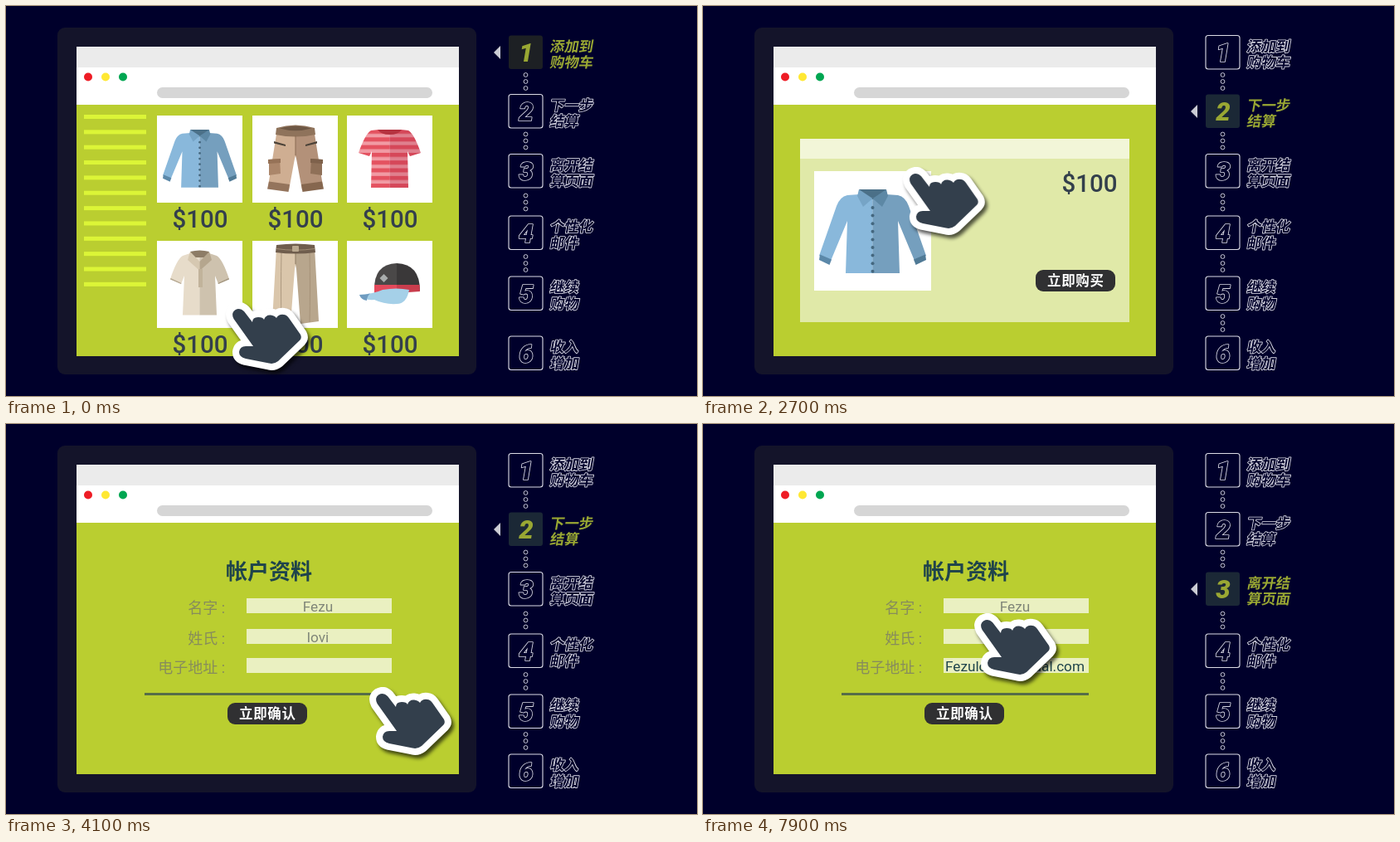
Animation, 833 px wide and 470 px high, one loop 8000 ms. Source, as an HTML page:

```html
<!DOCTYPE html>
<html lang="zh-CN">
<head>
<meta charset="utf-8">
<title>购物流程</title>
<style>
html, body { margin: 0; width: 100%; height: 100%; overflow: hidden; background: #00002b; }
svg { display: block; }
text { font-family: Roboto, "Noto Sans CJK SC", sans-serif; text-anchor: middle; }
.price { font-size: 29.5px; font-weight: 500; fill: #333f4c; }
.btn { font-size: 16.5px; font-weight: 700; fill: #fff; letter-spacing: .6px; }
.label { font-size: 18px; fill: #878c5c; text-anchor: end; font-weight: 400; }
.value { font-size: 17.2px; font-weight: 400; fill: #7f8578; }
.title { font-size: 26px; font-weight: 700; fill: #1f444b; }
.num { font: italic 900 31px Roboto, sans-serif; }
.cap { font-size: 17.4px; font-weight: 700; text-anchor: start; }
.off text { fill: #00002b; stroke: #dcdce6; stroke-width: 1.7px; paint-order: stroke; stroke-linejoin: round; }
.off rect { fill: none; stroke: #dcdce6; stroke-width: 1.1px; }
.on text { fill: #99a733; }
.on path { fill: #cbccd4; }
.dots { fill: none; stroke: #c8c8d4; stroke-width: 1px; }

#hand, #shop, #item, #form, .on, .off, #late { animation: 8s -1ms step-end infinite; }
#hand { animation-name: hand; }
#shop { animation-name: shop; }
#item { animation-name: item; }
#form { animation-name: form; }
#late { animation-name: late; }
.on.s1 { animation-name: on1; } .off.s1 { animation-name: off1; }
.on.s2 { animation-name: on2; } .off.s2 { animation-name: off2; }
.on.s3 { animation-name: on3; } .off.s3 { animation-name: off3; }

@keyframes hand {
  0% { transform: translate(265px, 357px); }
  6.25% { transform: translate(265px, 357px); animation-timing-function: steps(9, start); }
  17.5% { transform: translate(230px, 221px); animation-timing-function: steps(4, start); }
  22.5% { transform: translate(223px, 183px); }
  33.75% { transform: translate(223px, 183px); animation-timing-function: steps(6, start); }
  41.25% { transform: translate(330px, 249px); animation-timing-function: steps(3, start); }
  45% { transform: translate(378px, 278px); animation-timing-function: steps(6, start); }
  52.5% { transform: translate(438px, 317px); }
  63.75% { transform: translate(438px, 300px); }
  92.5% { transform: translate(438px, 300px); animation-timing-function: steps(6, start); }
  100% { transform: translate(327px, 228px); }
}
@keyframes shop {
  0% { opacity: 1; }
  17.5% { opacity: 1; animation-timing-function: steps(4, start); }
  22.5%, 100% { opacity: 0; }
}
@keyframes item {
  0% { opacity: 0; }
  17.5% { opacity: 0; animation-timing-function: steps(4, start); }
  22.5% { opacity: 1; }
  45% { opacity: 1; animation-timing-function: steps(6, start); }
  52.5%, 100% { opacity: 0; }
}
@keyframes form {
  0% { opacity: 0; }
  45% { opacity: 0; animation-timing-function: steps(6, start); }
  52.5%, 100% { opacity: 1; }
}
@keyframes late { 0% { visibility: hidden; } 27.5%, 100% { visibility: visible; } }
@keyframes on1 { 0% { visibility: visible; } 27.5%, 100% { visibility: hidden; } }
@keyframes off1 { 0% { visibility: hidden; } 27.5%, 100% { visibility: visible; } }
@keyframes on2 { 0% { visibility: hidden; } 27.5% { visibility: visible; } 57.5%, 100% { visibility: hidden; } }
@keyframes off2 { 0% { visibility: visible; } 27.5% { visibility: hidden; } 57.5%, 100% { visibility: visible; } }
@keyframes on3 { 0% { visibility: hidden; } 57.5%, 100% { visibility: visible; } }
@keyframes off3 { 0% { visibility: visible; } 57.5%, 100% { visibility: hidden; } }
</style>
</head>
<body>
<svg id="stage" width="833" height="470" viewBox="0 0 833 470"></svg>
<script>
const rect = (x, y, w, h, fill, r = 0) =>
  `<rect x="${x}" y="${y}" width="${w}" height="${h}" rx="${r}" fill="${fill}"/>`;
const path = (d, fill, extra = '') => `<path d="${d}" fill="${fill}" ${extra}/>`;
const dot = (x, y, r, fill) => `<circle cx="${x}" cy="${y}" r="${r}" fill="${fill}"/>`;
const text = (x, y, cls, s, extra = '') => `<text x="${x}" y="${y}" class="${cls}" ${extra}>${s}</text>`;
const group = (x, y, body, scale = 1) => `<g transform="translate(${x} ${y}) scale(${scale})">${body}</g>`;
const range = (n, fn) => Array.from({ length: n }, (_, i) => fn(i)).join('');
const line = (d, color, w = 1) => `<path d="${d}" fill="none" stroke="${color}" stroke-width="${w}"/>`;

// A left half plus its mirror image about x = mid
const halves = (mid, d, left, right) =>
  path(d, left) + path(d, right, `transform="translate(${mid * 2} 0) scale(-1 1)"`);

const shirt =
  halves(70.5, 'M54 28L40 29Q31 31 27 42L6 102L20 108L40 60L38 123H70.6V28Z', '#89b8db', '#759fbe') +
  halves(70.5, 'M7 100.5L21 106.5L18.5 113L6 107Z', '#5b88a9', '#507a96') +
  path('M54 22H87L83 34H58Z', '#4b7088') +
  halves(70.5, 'M54 22L70.5 33L59 43L52 30Z', '#76a4c6', '#5d88a5') +
  range(9, i => dot(70.5, 44 + i * 9.6, 2, '#44677f'));

const shorts =
  halves(52, 'M30 16L19 85L44 90L51 52L52.1 48V16Z', '#cfae92', '#b39179') +
  halves(52, 'M20 79.5L45 83L43.5 92L18 88.5Z', '#94745c', '#86674f') +
  halves(52, 'M20 53L33 52L34 70L20 72Z', '#ab866a', '#8f7058') +
  halves(52, 'M19 53L34 52V57L19 58Z', '#967257', '#7e614b') +
  halves(52, 'M26 31L40 35V37L26 33.5Z', '#4b4238', '#4b4238') +
  path('M29 15Q52 8 75 15L76 23Q52 28 28 23Z', '#8f735b') +
  path('M33 15.5Q52 10 71 15.5Q52 21 33 15.5Z', '#6d5744') +
  line('M52 24V48', '#8b6c55');

const teeShape = 'M38 17L29 18Q22 22 14 45L27 49L30 43L29 87H51.6V17Z';
const tee =
  halves(51.5, teeShape, 'url(#stripes)', 'url(#stripes)') +
  path(teeShape, '#a02040', 'opacity=".22" transform="translate(103 0) scale(-1 1)"') +
  path('M37 17H66Q62 23 51.5 23Q41 23 37 17Z', '#b5323f');

const polo =
  halves(51.5, 'M40 15L31 18Q24 22 16 46L29 52L33 42L31 89.5H51.6V15Z', '#e7dcca', '#cec2ae') +
  halves(51.5, 'M16.6 45L29.5 51L29 52L16 46.5Z', '#b5a892', '#a39680') +
  path('M40 13Q51.5 10 63 13L60 20H43Z', '#8d7c66') +
  halves(51.5, 'M40 13L51.5 25V36L37 23Z', '#d6c8b1', '#b5a68e') +
  path('M50 34H55V56H50Z', '#c1b39b');

const pants =
  halves(52, 'M29 8L24 97L46 100L51 34L52.1 28V8Z', '#dac6ab', '#b8a68d') +
  line('M35 14Q34 60 35 98M69 14Q70 60 69 98', '#a18d74', .8) +
  line('M52 14V28', '#8f7c65') +
  path('M29 5Q52 2 75 5L76 14Q52 17 28 14Z', '#6f5d4d') +
  line('M29 9.5Q52 13 75 9.5', '#a08c75') +
  rect(48, 6, 8, 7, '#b9a88f', 1);

const cap =
  path('M33 60Q32 28 60 27V62Z', '#4a4848') +
  path('M60 27Q88 28 88 60L60 62Z', '#3a3839') +
  path('M33 53H60V63H33Z', '#e4495b') +
  path('M60 53H87.6L88 61L60 63Z', '#c93d4d') +
  path('M44.5 40L49.5 45L44.5 50L39.5 45Z', '#a9adad') +
  path('M15 65Q32 64 43 59Q60 56 75 59Q72 76 60 76Q46 77 33 71Q20 72 15 65Z', '#a5d0e8') +
  path('M15 65Q22 65 28 63.5Q24 67 24 72Q17 71 15 65Z', '#6f9cc0');

const goods = [group(2.9, 1.8, shirt, .69), shorts, tee, polo, pants, cap];
const columns = [182, 297, 411];
const shop =
  range(12, i => rect(94, 131 + i * 18.35, 75, 5, '#dcf537')) +
  goods.map((g, i) => {
    const x = columns[i % 3], y = i < 3 ? 132 : 283;
    return rect(x, y, 103, 105, '#fff') + group(x, y, g) + text(x + 52, y + 134.5, 'price', '$100');
  }).join('');

const button = (x, y, s) => rect(x, y, 96, 26, '#303032', 9) + text(x + 48.3, y + 19, 'btn', s);

const item =
  rect(117, 160, 397, 221, '#e0e9a8') + rect(117, 160, 397, 24, '#f2f6d8') +
  rect(134, 199, 141, 144, '#fff') + group(134, 199, shirt) +
  text(466, 223.5, 'price', '$100') + button(401, 318, '立即购买');

const field = (y, label, value, extra) =>
  rect(290, y, 175, 18, '#eaf0c1') + text(264, y + 18, 'label', label + ' :') +
  text(376, y + 15.5, 'value', value, extra);
const form =
  text(317, 187, 'title', '帐户资料') +
  field(210, '名字', 'Fezu') + field(247, '姓氏', 'lovi') +
  field(282, '电子地址', '', 'id="mail" style="fill:#1f444b"') +
  rect(167, 324, 298, 3, '#566d48') + button(267, 336, '立即确认');

const steps = [
  [56, '添加到', '购物车'], [127, '下一步', '结算'], [199, '离开结', '算页面'],
  [273.5, '个性化', '邮件'], [346.5, '继续', '购物'], [418.5, '收入', '增加']
];
const caption = (y, s) => text(0, 0, 'cap', s, `transform="translate(655 ${y}) skewX(-10)"`);
const words = (y, i, a, b) =>
  text(627, y + 11, 'num', i + 1) + caption(y - 1.5, a) + caption(y + 18, b);
const stepList = steps.map(([y, a, b], i) => {
  const box = fill => rect(606, y - 20.5, 41, 40.5, fill, 3);
  const off = `<g class="off s${i + 1}">${box('none')}${words(y, i, a, b)}</g>`;
  if (i > 2) return off;
  const on = box(i ? '#1b2836' : '#1d2024') + words(y, i, a, b) + `<path d="M588 ${y}l8 -8v16z"/>`;
  return off + `<g class="on s${i + 1}">${on}</g>`;
}).join('');
const dotList = [83, 154.5, 228.5, 302, 374].map((y, i) =>
  `<g class="dots" ${i === 4 ? 'id="late"' : ''}>${range(3, k => dot(626.5, y + k * 8, 2.4, 'none'))}</g>`).join('');

const handShape = 'M9.5 20Q6 13 11 9.5Q17 6 22 11L32 24Q32 18 39 18Q45 18 46 21Q48 15 54 15.5Q59 16 61 19' +
  'Q64 14 70 15Q73 15 76 19L90 39Q92 43 89 46L63 71Q58 75 52 73.5L24 68Q16 66 16 60Q17 53 24 53L33 53Z';
const hand =
  `<g style="filter:drop-shadow(3px 4px 2px rgba(0,0,0,.65))">` +
  path(handShape, '#fff', 'stroke="#fff" stroke-width="16" stroke-linejoin="round"') + '</g>' +
  path(handShape, '#333f4c');

const layer = (id, body) => `<g id="${id}">${body}</g>`;
document.getElementById('stage').innerHTML =
  `<defs><pattern id="stripes" width="10" height="9.3" y="17" patternUnits="userSpaceOnUse">
    ${rect(0, 0, 10, 9.3, '#f19ba4')}${rect(0, 0, 10, 5, '#e45260')}</pattern></defs>` +
  rect(0, 0, 833, 470, '#00002b') + rect(62, 26, 505, 418, '#14142a', 9) +
  rect(85, 49, 461, 373, '#bace30') + rect(85, 49, 461, 70, '#fff') + rect(85, 49, 461, 25, '#ebebeb') +
  dot(99, 85.5, 5, '#ee1c25') + dot(120, 85.5, 5, '#ffe833') + dot(141, 85.5, 5, '#00a651') +
  rect(182, 98, 332, 13, '#d6d6d6', 6.5) +
  layer('shop', shop) + layer('item', item) + layer('form', form) +
  stepList + dotList + layer('hand', hand);

// Typing shares the clock of the hand's animation
const address = 'Fezulovi@qenual.com';
const mail = document.getElementById('mail');
const clock = document.getElementById('hand').getAnimations()[0];
function type() {
  const t = ((clock.currentTime || 0) + 1) % 8000;
  const typed = address.slice(0, Math.max(0, Math.floor(t / 100) - 55));
  if (mail.textContent !== typed) mail.textContent = typed;
  requestAnimationFrame(type);
}
type();
</script>
</body>
</html>
```
